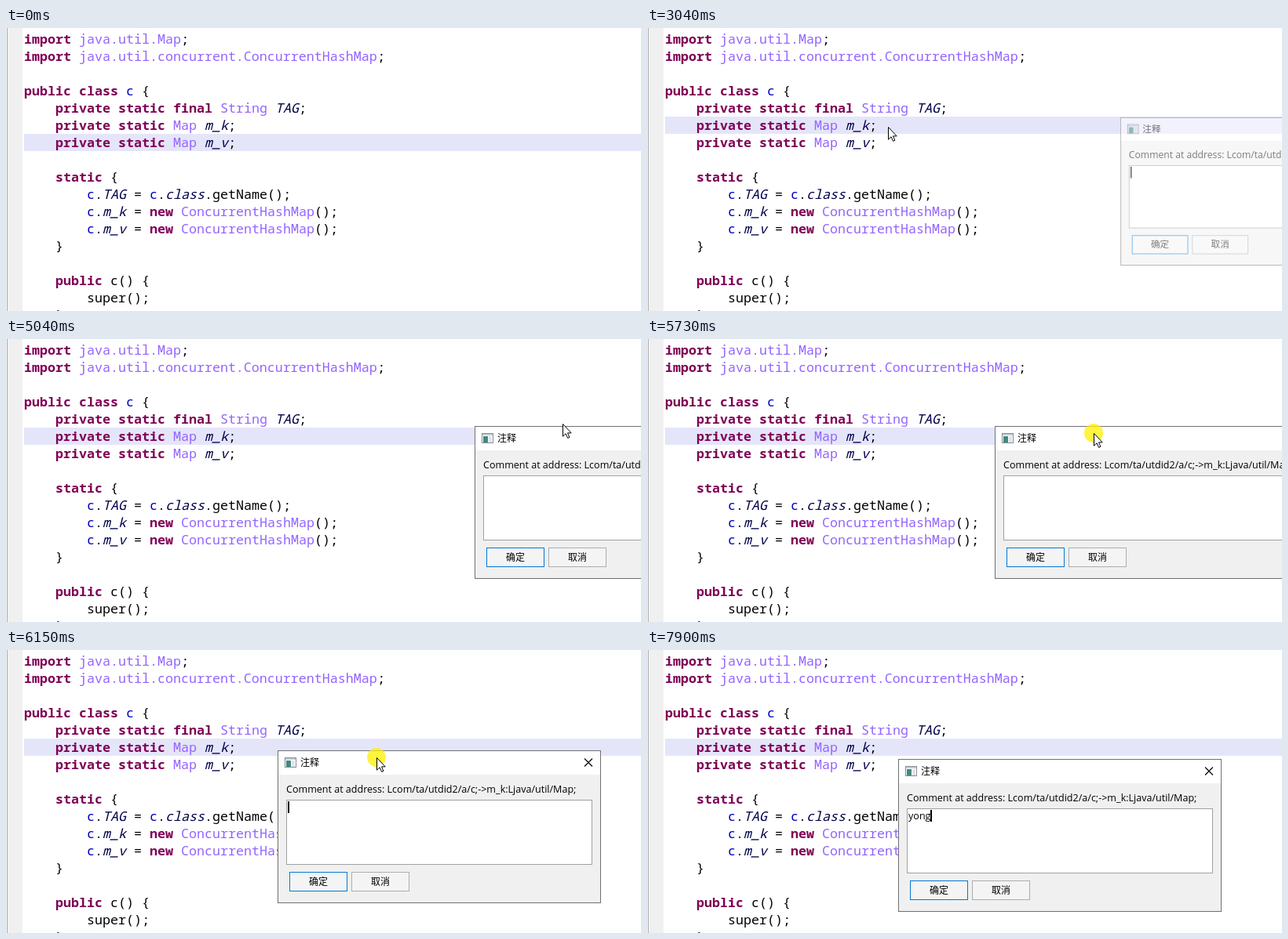
These frames come from a looping animation (809 by 361 pixels, 8000 ms). An HTML page:

```html
<!DOCTYPE html>
<html lang="en">
<head>
<meta charset="utf-8">
<title>Code comment dialog</title>
<style>
  html, body { margin: 0; width: 100%; height: 100%; overflow: hidden; background: #fff; }
  svg { display: block; }
  text { white-space: pre; }
  #code { font: 16.667px "Noto Sans Mono", "DejaVu Sans Mono", monospace; }
  .key { fill: #7f0055; font-weight: bold; }
  .type { fill: #9364ff; }
  .self { fill: #0000c0; }
  .field { fill: #00004b; font-style: italic; }
  #dialog { font: 12.54px "Open Sans", "Noto Sans", sans-serif; }
  .cjk { font: 12px "Noto Sans CJK SC", "Noto Sans CJK", sans-serif; }
  .mid { text-anchor: middle; }
</style>
</head>
<body>
<svg width="809" height="361" viewBox="0 0 809 361">
  <rect width="809" height="361" fill="#fff"/>
  <rect x="1" width="1" height="361" fill="#a8a8a8"/>
  <rect x="2" width="19" height="361" fill="#f0f0f0"/>
  <rect id="row" x="23" width="786" height="22" fill="#e5e5fa"/>
  <g id="code"></g>
  <rect id="codeCaret" x="293" y="113" width="2" height="22"/>

  <g id="dialog">
    <rect x=".5" y=".5" width="411" height="194" fill="#f0f0f0" stroke="#707070"/>
    <rect x="1" y="1" width="410" height="30" fill="#fff"/>
    <rect x="9.5" y="9.5" width="14" height="12" fill="#fff" stroke="#858c94"/>
    <rect x="10" y="10" width="13" height="2" fill="#c3cbd3"/>
    <rect x="11" y="13" width="6" height="8" fill="#3f8a80"/>
    <rect x="18" y="13" width="4" height="8" fill="#dfe4e8"/>
    <text class="cjk" x="29" y="20">注释</text>
    <path d="M391 10.5l10 10m0-10l-10 10" stroke="#000" stroke-width="1.1"/>
    <text x="11" y="54">Comment at address: Lcom/ta/utdid2/a/c;-&gt;m_k:Ljava/util/Map;</text>
    <rect x="11.5" y="63.5" width="389" height="82" fill="#fff" stroke="#a0a0a0"/>
    <text id="typed" x="13" y="77"></text>
    <rect id="caret" y="65" width="2" height="15"/>
    <rect x="15.5" y="155.5" width="73" height="24" fill="#f4f4f4" stroke="#0078d7"/>
    <rect x="94.5" y="155.5" width="73" height="24" fill="#f4f4f4" stroke="#adadad"/>
    <text class="cjk mid" x="52" y="171.5">确定</text>
    <text class="cjk mid" x="131" y="171.5">取消</text>
  </g>

  <g id="mouse">
    <circle id="press" r="12" fill="#fff000" fill-opacity=".75"/>
    <path d="M.5 .5V16.2L4.1 12.8L6.6 18.4L8.9 17.4L6.5 11.9H11.2Z" fill="#fff" stroke="#000"/>
  </g>
</svg>
<script>
const $ = id => document.getElementById(id);
const LOOP = 8000;

const source = `import java.util.Map;
import java.util.concurrent.ConcurrentHashMap;

public class c {
    private static final String TAG;
    private static Map m_k;
    private static Map m_v;

    static {
        c.TAG = c.class.getName();
        c.m_k = new ConcurrentHashMap();
        c.m_v = new ConcurrentHashMap();
    }

    public c() {
        super();
    }`;

const token = new RegExp([
  '(?<field>(?<=\\.)class|TAG|m_[kv])',
  '(?<key>\\b(?:import|public|private|static|final|class|new)\\b)',
  '(?<type>java[\\w.]+|String|ConcurrentHashMap|Map)',
  '(?<self>\\bc(?=[ .]))',
  '\\w+|[^\\w\\s]+'
].join('|'), 'g');

source.split('\n').forEach((line, i) => {
  for (const m of line.matchAll(token)) {
    const el = document.createElementNS('http://www.w3.org/2000/svg', 'text');
    const kind = Object.keys(m.groups).find(k => m.groups[k]);
    if (kind) el.setAttribute('class', kind);
    el.setAttribute('x', 23 + 10 * m.index);
    el.setAttribute('y', 20 + 22 * i);
    el.textContent = m[0];
    $('code').append(el);
  }
});

// Pointer moves: start time, screen refresh step, then [time, x, y] points.
const moves = [
  { start: 80, step: 46, path: [[80, 622, 303], [172, 540, 262], [264, 440, 208], [356, 362, 160], [448, 319, 133], [540, 307, 126]] },
  { start: 4520, step: 160 / 3, path: [[4520, 307, 126], [4627, 370, 116], [4733, 490, 104], [4840, 610, 97], [4920, 672, 97], [5000, 709, 108], [5160, 721, 114], [5320, 723, 120]] },
  { start: 5589.9, step: 140 / 3, path: [[5543, 723, 120], [5590, 692, 120], [5730, 569, 120], [5830, 530, 123], [5960, 499, 129], [6150, 472, 137], [6336, 448, 148], [6429, 446, 148]] }
];

function pointer(t) {
  const move = moves.filter(m => t >= m.start).pop() || moves[0];
  const { start, step, path } = move;
  const s = start + Math.floor((t - start) / step + 1e-6) * step;
  const i = path.findIndex(p => p[0] > s);
  if (i < 0) return path[path.length - 1].slice(1);
  const a = path[Math.max(i - 1, 0)], b = path[i];
  const k = b === a ? 0 : (s - a[0]) / (b[0] - a[0]);
  return [1, 2].map(n => Math.round(a[n] + (b[n] - a[n]) * k));
}

const within = (t, from, to) => t >= from && t < to;
const show = (id, on) => $(id).setAttribute('visibility', on ? 'inherit' : 'hidden');
// On at first, flips at every listed time.
const blink = (t, flips) => flips.filter(f => t >= f).length % 2 === 0;

const caretFlips = [3500, 4010, 4520, 5060, 5590, 6100, 6650, 7160];
const keyTimes = [7630, 7720, 7810, 7900];
const caretX = [13, 19, 27, 35, 41];

function draw(t) {
  const [x, y] = pointer(t);
  $('mouse').setAttribute('transform', `translate(${x} ${y})`);
  show('mouse', within(t, 80, keyTimes[0]));
  show('press', (within(t, 820, 900) || within(t, 5450, 6600)) && t < keyTimes[0]);

  $('row').setAttribute('y', t < 820 ? 135 : 113);
  show('codeCaret', within(t, 820, 2890) && blink(Math.min(t, 2400), [1330, 1890, 2380]));

  const dragged = t >= moves[2].start;
  const dx = dragged ? x - 126 : 597, dy = dragged ? y - 9 : 111;
  const p = Math.min(1, Math.max(0, Math.floor((t - 3040) / 48) / 5));
  const scale = 1 - .03 * (1 - p) ** 2;
  $('dialog').setAttribute('transform',
    `translate(${dx + 206 * (1 - scale)} ${dy + 97.5 * (1 - scale)}) scale(${scale})`);
  $('dialog').setAttribute('opacity', .5 + .5 * p);
  show('dialog', t >= 3040);

  const typed = keyTimes.filter(k => t >= k).length;
  $('typed').textContent = 'yong'.slice(0, typed);
  $('caret').setAttribute('x', caretX[typed]);
  show('caret', typed || blink(t, caretFlips));
}

const begin = performance.now();
function tick() {
  draw((performance.now() - begin) % LOOP);
  requestAnimationFrame(tick);
}
tick();
</script>
</body>
</html>
```
